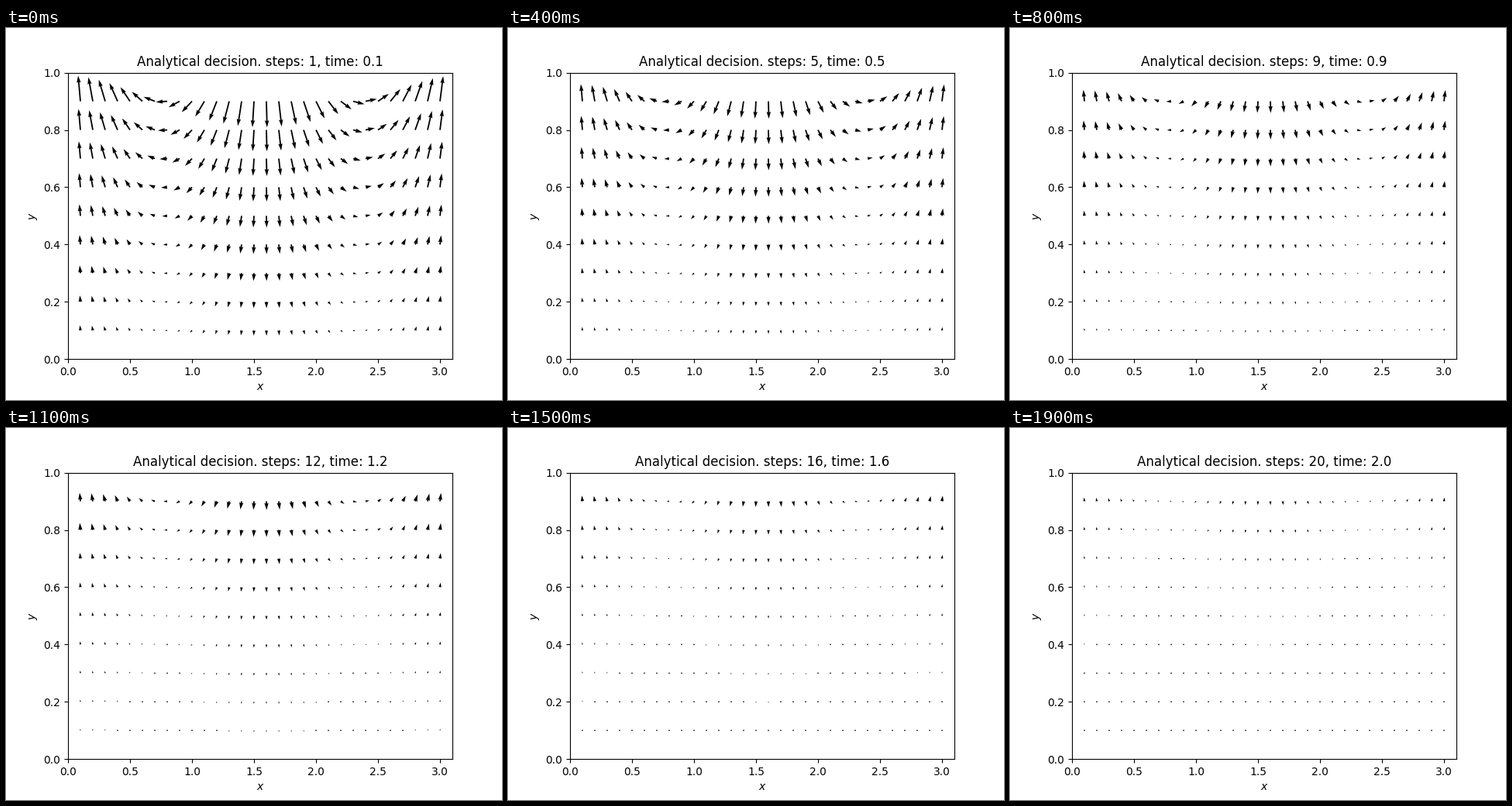
A matplotlib script that plays this animation: 640 by 480 pixels, repeating every 2000 ms.

```python
import numpy as np
import matplotlib.pyplot as plt
from matplotlib.animation import FuncAnimation

FRAMES = 20
INTERVAL = 100
DT = 0.1

fig, ax = plt.subplots(figsize=(6.4, 4.8), dpi=100)
x, y = np.meshgrid(0.1 * np.arange(1, 31), 0.1 * np.arange(1, 10))


def field(t):
    """Gradient of exp(2y - t) * cos(2x)."""
    amp = 2 * np.exp(2 * y - t)
    return -amp * np.sin(2 * x), amp * np.cos(2 * x)


arrows = ax.quiver(x, y, *field(DT), angles="xy", scale_units="xy", scale=120)
ax.set_xlim(0, 3.1)
ax.set_ylim(0, 1)
ax.set_xlabel("$x$")
ax.set_ylabel("$y$")
title = ax.set_title("")


def update(frame):
    step = frame + 1
    t = step * DT
    arrows.set_UVC(*field(t))
    title.set_text(f"Analytical decision. steps: {step}, time: {t:.1f}")
    return arrows, title


def init():
    return update(0)


anim = FuncAnimation(fig, update, frames=FRAMES, init_func=init,
                     interval=INTERVAL, repeat=True, repeat_delay=0)
plt.show()
```
